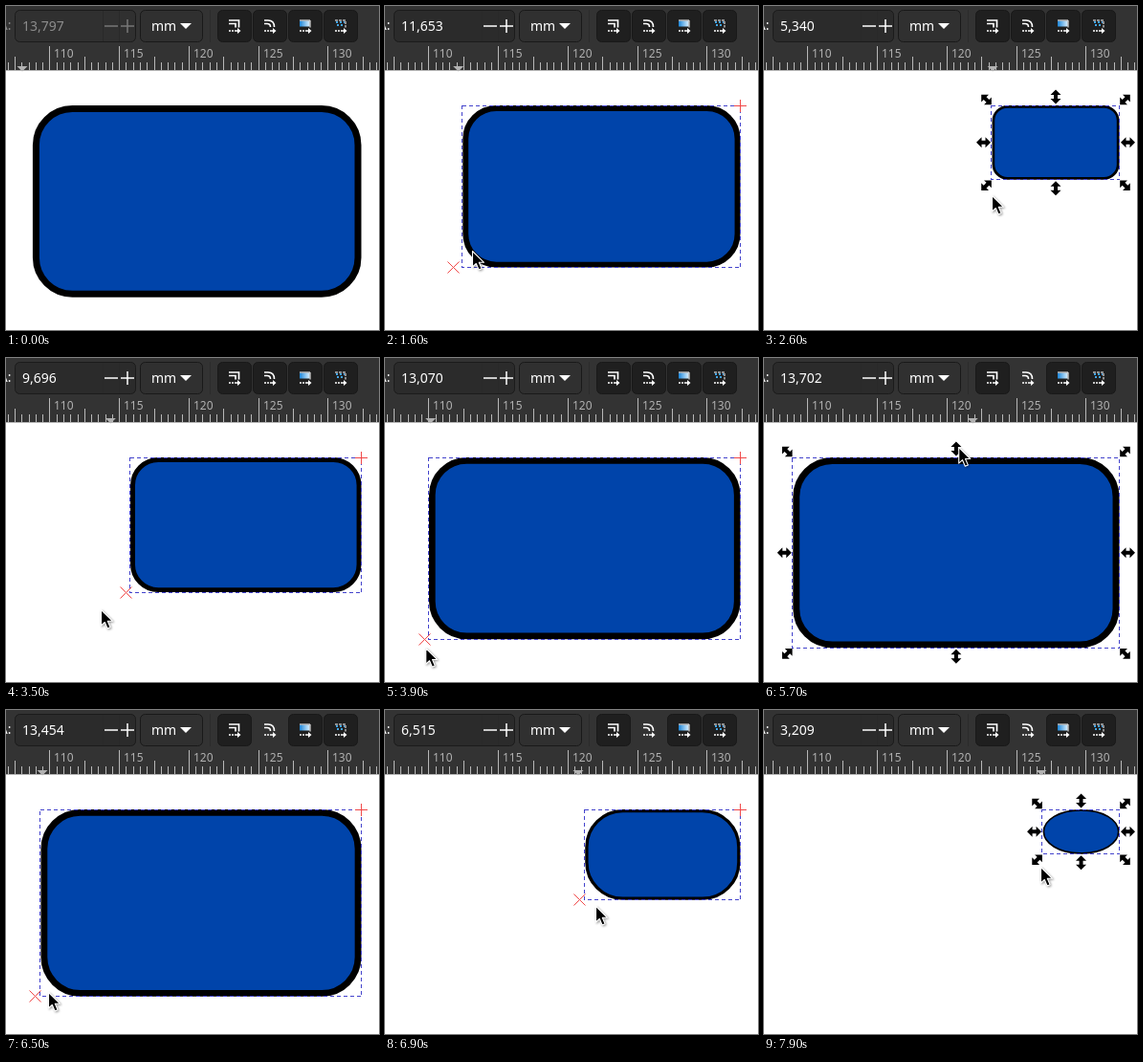
Recreate the animation shown at these times as an HTML page. Size 390 px wide and 339 px high, loop 8 s.

```html
<!DOCTYPE html>
<html lang="en">
<head>
<meta charset="utf-8">
<title>Scaling a rounded rectangle</title>
<style>
  html, body { margin: 0; width: 100%; height: 100%; overflow: hidden; background: #fff; }
  svg { display: block; width: 390px; height: 339px; }
  text { font: 14px "Noto Sans", "Open Sans", sans-serif; fill: #fff; }
  #ruler text { font-size: 12px; fill: #b0b0b0; }
  #ruler path { stroke: #b8b8b8; shape-rendering: crispEdges; }
  .off text { fill: #8c8c8c; }
  .off #steps { stroke: #777; }
  .off #field { fill: #303030; }
  .btn { fill: #1f1f1f; stroke: #191919; }
  #cursor { fill: #000; stroke: #fff; stroke-width: 1.1; filter: drop-shadow(1px 1px 1px #0006); }
  #cursor.bar { fill: #2c2c2c; }
</style>
</head>
<body>
<svg viewBox="0 0 390 339">
  <defs>
    <path id="arrow" d="M-7.5 0L-2-5.5V-2H2V-5.5L7.5 0L2 5.5V2H-2V5.5Z"/>
    <path id="dots" d="M-6 5.5h2m1 0h2m1 0h4" stroke="#fff" stroke-width="1.6"/>
    <path id="head" d="M3 2.5L6.500 5.5L3 8.5Z" fill="#fff"/>
    <linearGradient id="fade"><stop stop-color="#1c86d8"/><stop offset="1" stop-color="#d8efff"/></linearGradient>
  </defs>
  <rect width="390" height="339" fill="#fff"/>
  <rect id="shape" fill="#0044aa" stroke="#000"/>
  <rect id="box" fill="none" stroke="#4343cc" stroke-dasharray="4 3" shape-rendering="crispEdges"/>
  <g id="handles"></g>
  <g id="snap" fill="none" stroke="#f04848">
    <path d="M365 104.5h13M371.5 98v13"/>
    <path id="cross" d="M-6-6L6 6M-6 6L6-6"/>
  </g>

  <rect width="390" height="67.5" fill="#333"/>
  <g id="ruler"></g>
  <path id="marker" d="M-5.5 63H5.5L0 68.5Z" fill="#b2b2b2"/>

  <g id="entry">
    <text x="5.5" y="25" text-anchor="end">A:</text>
    <rect id="field" x="9.5" y="4.5" width="126" height="33" rx="5" fill="#2b2b2b" stroke="#1b1b1b"/>
    <path d="M101.5 5v32M118.5 5v32" stroke="#292929"/>
    <text id="value" x="17" y="26"></text>
    <path id="steps" d="M103 21h14M120 21h14M127 14v14" stroke="#fff" stroke-width="1.5"/>
  </g>
  <rect x="140.5" y="4.5" width="65" height="33" rx="5" fill="#303030" stroke="#191919"/>
  <text x="152" y="26">mm</text>
  <path d="M182 18H194L188 24Z" fill="#fff"/>
  <path d="M213.5 4v34" stroke="#2b2b2b"/>
  <g id="buttons"></g>
  <path id="cursor" stroke-linejoin="round" d="M0 0V16.5L3.8 13L6.6 19.5L9.6 18.2L6.8 11.8H12Z"/>
</svg>
<script>
const $ = id => document.getElementById(id);
const NS = "http://www.w3.org/2000/svg";
function set(el, attrs) {
  for (const k in attrs) el.setAttribute(k, attrs[k]);
}
function add(parent, tag, attrs) {
  const el = document.createElementNS(NS, tag);
  set(el, attrs);
  return parent.appendChild(el);
}
const show = (el, on) => el.setAttribute("visibility", on ? "visible" : "hidden");
const move = (el, x, y, more = "") => el.setAttribute("transform", `translate(${x} ${y}) ${more}`);

const LOOP = 8000, STEP = 100, SELECT = 700, TOGGLE = 5400;
const MM = 14.55, RIGHT = 371.5, TOP = 104, ASPECT = 1.7115;
const FULL = 13.797, REGROWN = 13.702, RADIUS = 38, LAG = 40;

// Turning points of the hand: time, x, y
const pointer = [
  [200, -20, 285], [700, 52, 268], [1100, 24, 311], [1400, 23, 308], [1600, 92, 257],
  [2100, 240, 183], [2600, 239, 199], [3200, 203, 203], [3500, 100, 264], [4200, 26, 317],
  [4800, 229, 46], [5200, 268, 19], [5400, 268, 19], [6300, 22, 309], [6500, 45, 296],
  [7100, 276, 177], [7900, 290, 165]
];
// Time, height in mm: each drag has a start, a middle and an end
const height = [
  [1400, FULL], [1600, 11.653], [2100, 5.34],
  [3200, 5.34], [3500, 9.696], [4100, REGROWN],
  [6300, REGROWN], [6500, 13.454], [7100, 3.95], [7700, 3.209]
];
const drags = [
  { from: 1500, to: 2200, gap: 9 },
  { from: 3300, to: 4200, gap: 4 },
  { from: 6300, to: 7800, gap: 5 }
];

// Slope at a key: level at turning points, otherwise the harmonic mean of both sides
function slope(keys, i, n) {
  if (i === 0 || i === keys.length - 1) return 0;
  const rate = j => (keys[j + 1][n] - keys[j][n]) / (keys[j + 1][0] - keys[j][0]);
  const a = rate(i - 1), b = rate(i);
  return a * b <= 0 ? 0 : 2 * a * b / (a + b);
}

// Smooth curve through the keys that never overshoots
function at(keys, t, n = 1) {
  const end = keys.length - 1;
  if (t <= keys[0][0]) return keys[0][n];
  if (t >= keys[end][0]) return keys[end][n];
  const i = keys.findIndex(k => k[0] > t) - 1;
  const a = keys[i], b = keys[i + 1], span = b[0] - a[0];
  const p = (t - a[0]) / span, q = 1 - p;
  return a[n] * q * q * (1 + 2 * p) + b[n] * p * p * (3 - 2 * p)
    + span * p * q * (slope(keys, i, n) * q - slope(keys, i + 1, n) * p);
}

// Ruler: a tick each half millimetre
let ticks = "M0 67.5H390";
for (let i = -6; i < 48; i++) {
  const x = Math.round(45.4 + i * MM / 2) + 0.5;
  const len = i % 10 === 0 ? 25 : i % 5 === 0 ? 14 : 8;
  ticks += `M${x} 67v${-len}`;
  if (i >= 0 && i % 10 === 0) add($("ruler"), "text", { x: x + 4.5, y: 54 }).textContent = 110 + i / 2;
}
add($("ruler"), "path", { d: ticks });

// Toggle buttons
const icons = [
  '<path d="M-6-5.5H4.5V2M-6-2H1V2" fill="none" stroke="#fff" stroke-width="1.7"/>',
  '<path d="M-6-5.5H-2Q4.5-5.5 4.5 1.5M-6-2H-3Q.5-2 .5 1.5" fill="none" stroke="#fff" stroke-width="1.6"/>',
  '<path d="M-6-5H4.5V1H-6Z" fill="url(#fade)"/><path d="M-6-5.5H5V2" fill="none" stroke="#fff"/>',
  '<path d="M-5-3.5H4M-4-.5H4" stroke="#42a5e8" stroke-width="2" stroke-dasharray="2 2"/><path d="M-6-5.5H5V2" fill="none" stroke="#fff" stroke-dasharray="3 1"/>'
];
const backs = icons.map((icon, i) => {
  const x = 221 + 37 * i;
  const back = add($("buttons"), "rect", { x: x + 0.5, y: 4.5, width: 35, height: 33, rx: 5, class: "btn" });
  const g = add($("buttons"), "g", { transform: `translate(${x + 18} 20.5)` });
  g.innerHTML = icon + '<use href="#dots"/><use href="#head"/>';
  return back;
});

// Scale handles around the selection
const handles = [];
for (const dx of [-1, 0, 1]) for (const dy of [-1, 0, 1]) {
  if (dx || dy) handles.push({ dx, dy, el: add($("handles"), "use", { href: "#arrow" }) });
}

function drawShape(t, mm) {
  const scale = mm / FULL, line = 7 * scale;
  const h = mm * MM, w = h * ASPECT, left = RIGHT - w;
  const r = RADIUS * (t < TOGGLE ? scale : REGROWN / FULL);
  set($("shape"), {
    x: left + line / 2, y: TOP + line / 2, width: w - line, height: h - line,
    rx: r, ry: r, "stroke-width": line
  });

  const drag = drags.find(d => t >= d.from && t < d.to);
  const x = Math.floor(left - 0.8) + 0.5, y = Math.floor(TOP + h) + 0.5;
  set($("box"), { x, y: 104.5, width: RIGHT - x, height: y - 104.5 });
  show($("box"), t >= SELECT);
  show($("handles"), t >= SELECT && !drag);
  show($("snap"), drag);
  if (drag) move($("cross"), x - drag.gap, y);
  for (const { dx, dy, el } of handles) {
    const gap = dx && dy ? 6 : 9;
    const turn = dx && dy ? 45 * dx * dy : dx ? 0 : 90;
    move(el, left + w / 2 + dx * (w / 2 + gap), TOP + h / 2 + dy * (h / 2 + gap), `rotate(${turn})`);
  }
}

function drawPointer(t) {
  const x = at(pointer, t, 1), y = at(pointer, t, 2), inBar = y < 67;
  move($("marker"), inBar ? 223 : Math.max(17, at(pointer, t - LAG)), 0);
  move($("cursor"), x - 0.5, y - 0.5, inBar ? "scale(1.25)" : "");
  $("cursor").setAttribute("class", inBar ? "bar" : "");
}

function render(t) {
  const mm = at(height, t);
  drawShape(t, mm);
  drawPointer(t);
  $("entry").setAttribute("class", t < SELECT ? "off" : "");
  $("value").textContent = mm.toFixed(3).replace(".", ",");
  show(backs[1], t < TOGGLE);
}

const start = performance.now();
function tick() {
  const t = (performance.now() - start) % LOOP;
  render(Math.floor(t / STEP) * STEP);
  requestAnimationFrame(tick);
}
tick();
</script>
</body>
</html>
```
